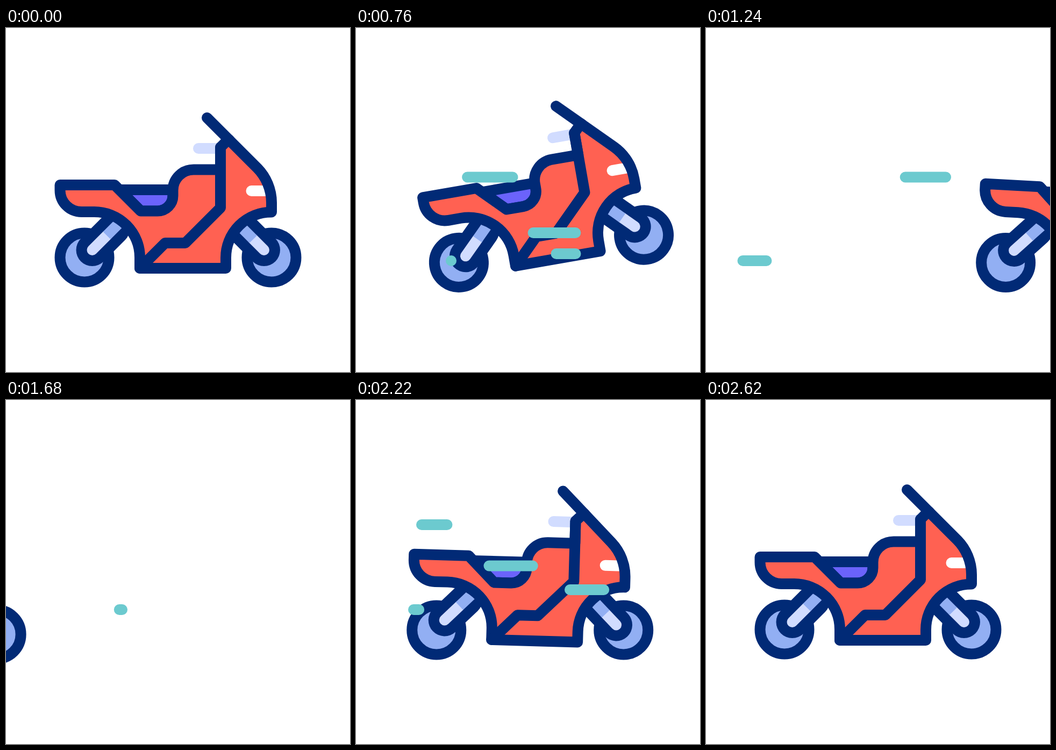
An HTML page that plays this animation: 640x640 px, repeating every 2800 ms.

```html
<!DOCTYPE html>
<html lang="en">
<head>
<meta charset="utf-8">
<title>Motorbike</title>
<style>
  html, body { margin: 0; width: 100%; height: 100%; overflow: hidden; background: #fff; }
  svg { display: block; width: 100vw; height: 100vh; fill: none; stroke: #012a76; stroke-width: 20; stroke-linecap: round; stroke-linejoin: round; }
  .wheel { fill: #92aff3; }
  .fork { stroke-width: 60; }
  .pale { stroke: #d1dcff; }
  .blue { stroke: #92aff3; stroke-linecap: butt; }
  .red { fill: #ff6152; stroke: none; }
  .seat { fill: #6b63fb; }
  .lamp { stroke: #fff; }
  #streaks { stroke: #6ccacf; }
</style>
</head>
<body>
<svg viewBox="0 0 640 640">
  <defs>
    <path id="shell" d="M100.5 292H202L250.5 340.5H282A28.5 28.5 0 0 0 310.5 312V302A38.5 38.5 0 0 1 349 263.5H399V222L414 207L467 260A92 92 0 0 1 494 325V342.5A85 85 0 0 0 409 427.5V447H249V427A85 85 0 0 0 164 342H140.5A40 40 0 0 1 100.5 302Z"/>
  </defs>
  <g id="bike">
    <circle class="wheel" cx="146" cy="427" r="45.5"/>
    <circle class="wheel" cx="494" cy="427" r="45.5"/>
    <g id="body">
      <path class="fork" d="M160.5 413l40 -40M480 413l-40 -40"/>
      <path class="pale" d="M160.5 413l27 -27M480 413l-20 -20"/>
      <path class="blue" d="M187.5 386l24 -24M460 393l-26 -26"/>
      <path class="pale" d="M358 224H396"/>
      <path class="seat" d="M211 301H310.5V312A28.5 28.5 0 0 1 282 340.5H250.5Z"/>
      <use href="#shell" class="red"/>
      <path class="lamp" d="M456.5 303H490"/>
      <use href="#shell"/>
      <path d="M374 167L416 209M399 222V334.5L333.5 400H296L249 447"/>
    </g>
  </g>
  <g id="streaks"></g>
</svg>
<script>
const LOOP = 2800, RUN = 500, LAG = 200;
const AWAY = 553, OVERSHOOT = 22;
const $ = id => document.getElementById(id);

// Smooth 0 to 1 while t goes from a to b
const ramp = (t, a, b) => {
  const u = Math.min(1, Math.max(0, (t - a) / (b - a)));
  return u * u * (3 - 2 * u);
};
const bump = (t, a, peak, b) => ramp(t, a, peak) - ramp(t, peak, b);

const bikeX = t => t < 1560
  ? AWAY * ramp(t, 595, 1560)
  : (AWAY + OVERSHOOT) * ramp(t, 1560, 2300) - AWAY - OVERSHOOT * ramp(t, 2300, 2620);
const bikeY = t => 9.5 * (ramp(t, 220, 720) - ramp(t, 1560, 2380));
const wheelie = t => -12.7 * bump(t, 220, 610, 1000);
const squat = t => -1.5 * (ramp(t, 220, 500) - ramp(t, 740, 1000));
const dive = t => 3.1 * (ramp(t, 740, 1000) - ramp(t, 1300, 1560)) + 1.8 * bump(t, 1900, 2300, 2600);

const streaks = [];

// A row of streaks set off at an even gap, each given as y, right end, length
function wave(first, gap, ...rows) {
  rows.forEach(([y, right, length], i) => {
    const line = document.createElementNS('http://www.w3.org/2000/svg', 'line');
    line.setAttribute('y1', y);
    line.setAttribute('y2', y);
    $('streaks').append(line);
    streaks.push({ line, right, length, start: first + i * gap });
  });
}
wave(240, 101, [420, 495.5, 123], [277.5, 358, 162], [381, 428.5, 141]);
wave(760, 60, [433, 177, 109], [277.5, 506, 145]);
wave(1615, 95, [390, 216, 109], [232, 270, 148], [353, 509, 120], [308.5, 350, 145]);

function draw(now) {
  const t = now % LOOP;
  $('bike').setAttribute('transform', `translate(${bikeX(t)} ${bikeY(t)}) rotate(${wheelie(t)} 146 414)`);
  $('body').setAttribute('transform', `rotate(${squat(t) + dive(t)} 320 427)`);

  for (const { line, start, right, length } of streaks) {
    const age = t - start;
    const at = a => right - length * ramp(a, 0, RUN);
    line.style.display = age > 0 && age < RUN + LAG ? '' : 'none';
    line.setAttribute('x1', at(age));
    line.setAttribute('x2', at(age - LAG) + 0.01);
  }
  requestAnimationFrame(draw);
}
draw(performance.now());
</script>
</body>
</html>
```
